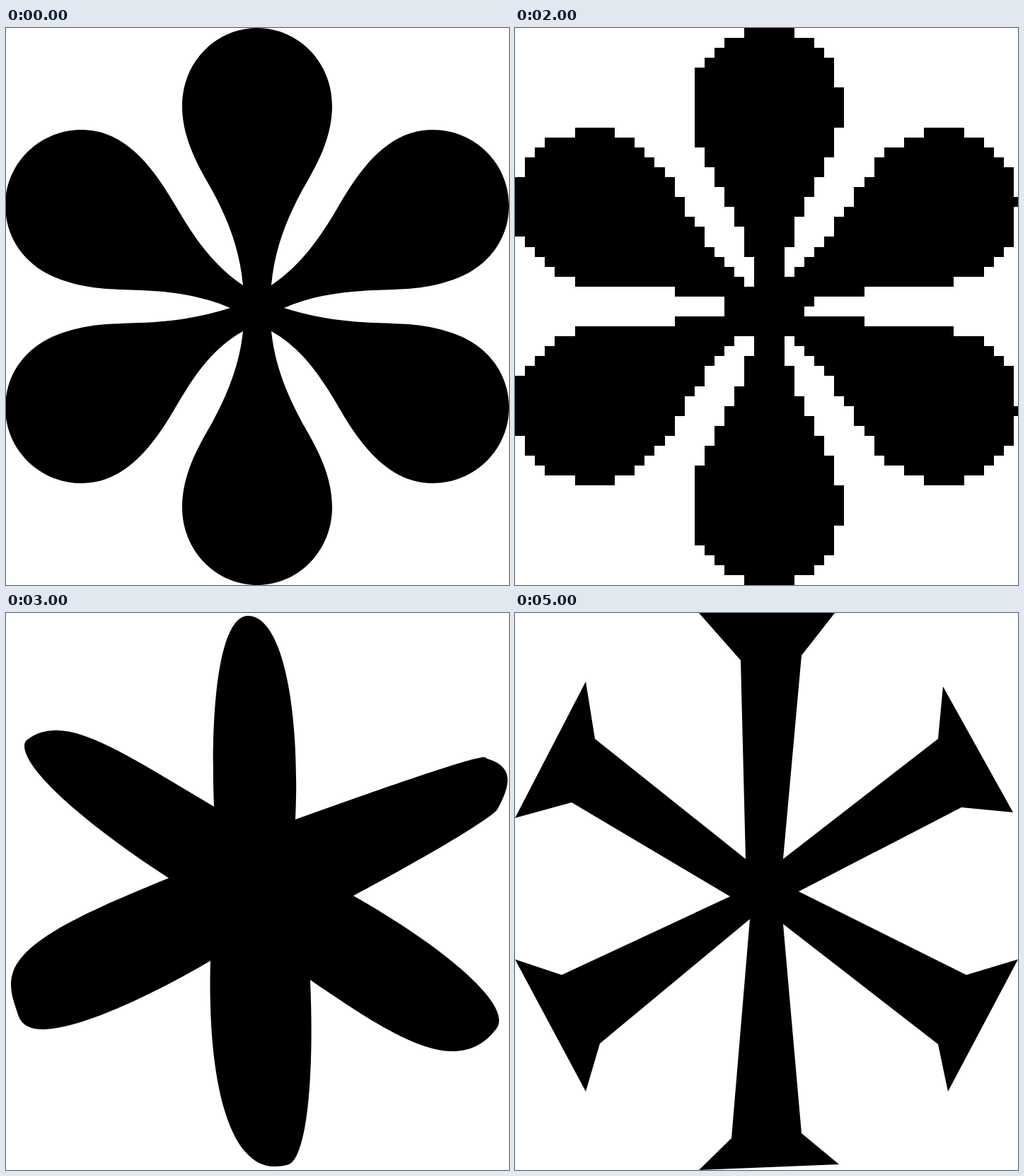
Write an HTML page that moves like this. It is 711x788 px and loops after 6 s.

```html
<!DOCTYPE html>
<html lang="en">
<head>
<meta charset="utf-8">
<title>Asterisk</title>
<style>
  html, body { margin: 0; width: 100%; height: 100%; overflow: hidden; background: #fff; }
  svg { display: block; width: 100%; height: 100%; }
  .pose { visibility: hidden; }
  .pose.on { visibility: visible; }
  .pixel { shape-rendering: crispEdges; }
  .core { fill: #696765; stroke: #756a60; stroke-width: 15; }
  .shine { fill: #94908f; }
</style>
</head>
<body>
<svg viewBox="0 0 711 788">
  <defs>
    <path id="flower"/>
    <clipPath id="inside"><use href="#flower"/></clipPath>
    <filter id="soft"><feGaussianBlur stdDeviation="2"/></filter>
    <filter id="softer"><feGaussianBlur stdDeviation="5"/></filter>
    <g id="sideCores">
      <path d="M 440 350 C 490 325 500 209 590 206 C 640 206 686 215 686 250
        C 686 295 655 312 610 317 C 560 324 490 325 440 350 Z"/>
      <path d="M 440 440 C 500 469 540 470 590 473 C 650 473 686 495 686 530
        C 686 571 650 596 605 596 C 545 596 500 520 440 440 Z"/>
    </g>
  </defs>

  <g class="pose"><use href="#flower"/></g>

  <g class="pose">
    <path d="M 225 33 C 270 13 315 0 360 0 C 402 0 445 10 486 25 L 441 243
      L 587 92 C 625 122 655 158 675 200 C 692 236 704 280 711 326 L 518 394
      L 711 461 C 702 510 688 560 666 603 C 646 642 615 675 579 704 L 433 537
      L 486 763 Q 356 812 225 763 L 278 545
      L 124 695 C 90 668 55 630 36 590 C 18 552 6 505 0 461 L 186 394
      L 0 326 C 6 280 18 232 36 192 C 55 152 90 114 124 84 L 270 243 Z"/>
  </g>

  <g class="pose pixel"><path id="blocks" transform="scale(14.1 14.07)"/></g>

  <g class="pose">
    <path d="M 294 274 C 288 120 304 4 342 4 C 392 4 416 140 409 292
      C 560 238 665 202 677 204 L 680 206 C 700 212 709 222 709 236
      C 709 250 701 266 695 277 C 690 288 600 342 491 400
      C 610 468 698 540 697 577 Q 697 585 690 592
      C 674 611 655 620 631 620 C 580 620 510 574 430 519
      C 436 660 425 768 400 780 Q 392 783 379 783
      C 318 783 284 670 289 492 C 190 550 98 589 52 589
      C 34 589 23 583 18 571 C 12 553 7 540 7 525 C 7 472 90 432 230 375
      C 110 297 26 222 26 188 Q 26 181 32 178
      C 42 170 56 166 71 166 C 120 166 190 212 294 274 Z"/>
  </g>

  <g class="pose" transform="translate(357 394) scale(.984) translate(-355.5 -394)">
    <use href="#flower" fill="none" stroke="#ddd" stroke-width="3" stroke-dasharray="70 45" transform="translate(2 1)"/>
    <g clip-path="url(#inside)">
      <use href="#flower" fill="#42566a"/>
      <use href="#flower" fill="none" stroke="#8a9dbd" stroke-width="22" filter="url(#softer)"/>
      <g class="core" filter="url(#soft)">
        <path d="M 352 325 C 338 255 275 170 275 110 C 275 85 315 66 357 66
          C 398 66 438 85 438 110 C 438 170 378 255 366 325 Z"/>
        <path d="M 355 500 C 340 545 277 610 274 670 C 272 711 305 738 357 738
          C 408 738 438 711 436 670 C 433 610 375 545 355 500 Z"/>
        <use href="#sideCores"/>
        <use href="#sideCores" transform="matrix(-1 0 0 1 711 0)"/>
      </g>
      <g filter="url(#soft)">
        <path d="M 336 395 L 285 350 M 375 395 L 440 352 M 336 400 L 282 444 M 375 400 L 440 440 M 355 420 V 490"
          fill="none" stroke="#77706c" stroke-width="22"/>
        <ellipse cx="355" cy="396" rx="40" ry="22" fill="#777372"/>
        <ellipse cx="355" cy="360" rx="13" ry="16" fill="#42566a"/>
        <ellipse cx="355" cy="494" rx="10" ry="17" fill="#4b5b6d"/>
        <ellipse cx="359" cy="398" rx="13" ry="14" fill="#989391"/>
      </g>
      <g class="shine" filter="url(#soft)">
        <path d="M 345 100 C 360 90 385 92 402 96 C 406 140 380 200 372 240
          C 368 265 360 275 355 268 C 345 250 352 220 350 180 C 348 150 338 115 345 100 Z"/>
        <path d="M 100 250 C 105 232 140 232 170 245 C 200 258 225 290 232 318
          C 200 300 165 295 135 290 C 110 282 98 268 100 250 Z"/>
        <path d="M 100 555 C 90 530 110 505 150 497 C 190 490 230 475 250 462
          C 230 490 205 525 170 545 C 140 560 110 572 100 555 Z"/>
        <path d="M 552 278 C 565 250 590 235 620 234 C 650 230 680 232 690 245
          C 690 270 670 285 640 290 C 600 295 570 295 552 278 Z"/>
        <path d="M 552 505 C 590 503 620 508 680 508 C 690 530 685 560 650 567
          C 610 575 595 560 585 540 C 575 525 555 520 552 505 Z"/>
        <path d="M 362 565 C 380 560 420 600 418 650 C 415 690 390 715 360 712
          C 335 710 340 680 350 655 C 358 630 355 590 362 565 Z"/>
      </g>
      <use href="#flower" fill="none" stroke="#f4f6fb" stroke-width="9" stroke-dasharray="50 70 22 40"/>
    </g>
    <use href="#flower" fill="none" stroke="#17181d" stroke-width="3"/>
    <use href="#flower" fill="none" stroke="#fff" stroke-width="3" stroke-dasharray="18 60 34 85"/>
  </g>

  <g class="pose">
    <path d="M 260 0 L 319 67 L 326 348 L 113 178 L 100 97 L 0 290 L 80 268 L 304 401
      L 66 512 L 0 490 L 100 677 L 120 609 L 332 433 L 306 743 L 260 788
      L 458 780 L 405 736 L 379 440 L 598 610 L 612 677 L 711 490 L 638 512 L 401 394
      L 631 275 L 704 282 L 605 104 L 598 178 L 379 348 L 405 60 L 452 0 Z"/>
  </g>
</svg>
<script>
  const byId = id => document.getElementById(id);

  // Upper right quarter of the flower as cubic points; the rest is mirrored.
  const quarter = [
    [355, 0], [413, 0], [461, 48], [461, 110],
    [461, 155], [440, 193], [419, 229],
    [398, 268], [380, 310], [375, 364],
    [418, 335], [445, 295], [470, 252],
    [500, 200], [540, 144], [603, 144],
    [663, 144], [711, 192], [711, 251],
    [711, 300], [680, 337], [640, 353],
    [595, 371], [560, 369], [520, 371],
    [470, 373], [430, 380], [393, 396]
  ];
  const reflect = (points, map) => points.slice(0, -1).reverse().map(map);
  // The lower notches sit slightly further out than the upper ones.
  const lower = reflect(quarter, ([x, y]) => [x, y === 364 ? 429 : 788 - y]);
  const half = quarter.concat(lower);
  const [start, ...rest] = half.concat(reflect(half, ([x, y]) => [710 - x, y]));
  const outline = `M${start} C${rest.join(' ')} Z`;
  byId('flower').setAttribute('d', outline);

  // Sample the flower on a coarse grid to get its blocky version.
  function blocky(shape, cols, rows) {
    const ctx = document.createElement('canvas').getContext('2d');
    const path = new Path2D(shape);
    let d = '';
    for (let r = 0; r < rows; r++) {
      for (let c = 0; c < cols; c++) {
        if (ctx.isPointInPath(path, (c + 0.4) * 14.1, (r + 0.5) * 14.07)) d += `M${c} ${r} h1 v1 h-1 z `;
      }
    }
    return d;
  }
  byId('blocks').setAttribute('d', blocky(outline, 51, 56));

  const HOLD = 1000;
  const poses = [...document.querySelectorAll('.pose')];
  const origin = performance.now();

  function draw(now) {
    const current = Math.floor(Math.max(0, now - origin) / HOLD) % poses.length;
    poses.forEach((pose, i) => pose.classList.toggle('on', i === current));
    requestAnimationFrame(draw);
  }
  draw(origin);
</script>
</body>
</html>
```
